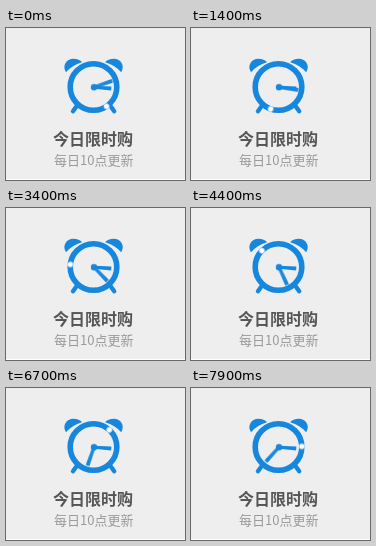
Write an HTML page that moves like this. It is 179 px wide and 152 px high and loops after 8000 ms.

```html
<!DOCTYPE html>
<html lang="zh-CN">
<head>
<meta charset="utf-8">
<title>今日限时购</title>
<style>
  html, body { margin: 0; width: 100%; height: 100%; overflow: hidden; background: #eee; }
  svg { display: block; width: 179px; height: 152px; }
  text { font-family: "Noto Sans CJK SC", "Noto Sans CJK", "Noto Sans", sans-serif; }
  .title { font-size: 16px; font-weight: 700; fill: #555; }
  .note { font-size: 13px; fill: #999; }
  .line { fill: none; stroke: #1787de; }
  .solid { fill: #1787de; }
  #minute, #dot { transform-box: view-box; transform-origin: 0 0; }
</style>
</head>
<body>
<svg viewBox="0 0 179 152">
  <defs>
    <g id="side">
      <path class="solid" d="M60 44.3C55.8 38 60.3 30.8 67.3 30.8C71.3 30.8 74.5 32.3 76 34.2C69.3 36.3 64 39.6 60 44.3Z"/>
      <path class="line" stroke-width="4.4" stroke-linecap="round" d="M70 79L67 83.2"/>
    </g>
  </defs>
  <rect y="151" width="179" height="1" fill="#fff"/>
  <use href="#side"/>
  <use href="#side" transform="translate(175.2 0) scale(-1 1)"/>
  <circle class="line" cx="87.5" cy="59" r="23.3" stroke-width="5.6"/>
  <g transform="translate(88 59.2)">
    <path class="solid" d="M0 -1.5L17.3 -2V2L0 1.5Z" transform="rotate(4)"/>
    <path id="minute" class="solid" d="M0 -1.5L19.5 -2V2L0 1.5Z"/>
    <circle class="solid" r="3.2"/>
  </g>
  <g transform="translate(87.5 59)">
    <circle id="dot" cx="23.3" r="2.7" fill="#fff"/>
  </g>
  <text class="title" x="47" y="117">今日限时购</text>
  <text class="note" x="48" y="136.5">每日10点更新</text>
</svg>
<script>
  const LOOP = 8000, STEPS = 80;
  const TURN = 360 / 94; // degrees the dot travels per step

  function spin(id, from, perStep) {
    const to = from + perStep * STEPS;
    document.getElementById(id).animate(
      [{ transform: `rotate(${from}deg)` }, { transform: `rotate(${to}deg)` }],
      { duration: LOOP, iterations: Infinity, easing: `steps(${STEPS}, end)` }
    );
  }

  spin("minute", -19, TURN / 2);
  spin("dot", 56, TURN);
</script>
</body>
</html>
```
